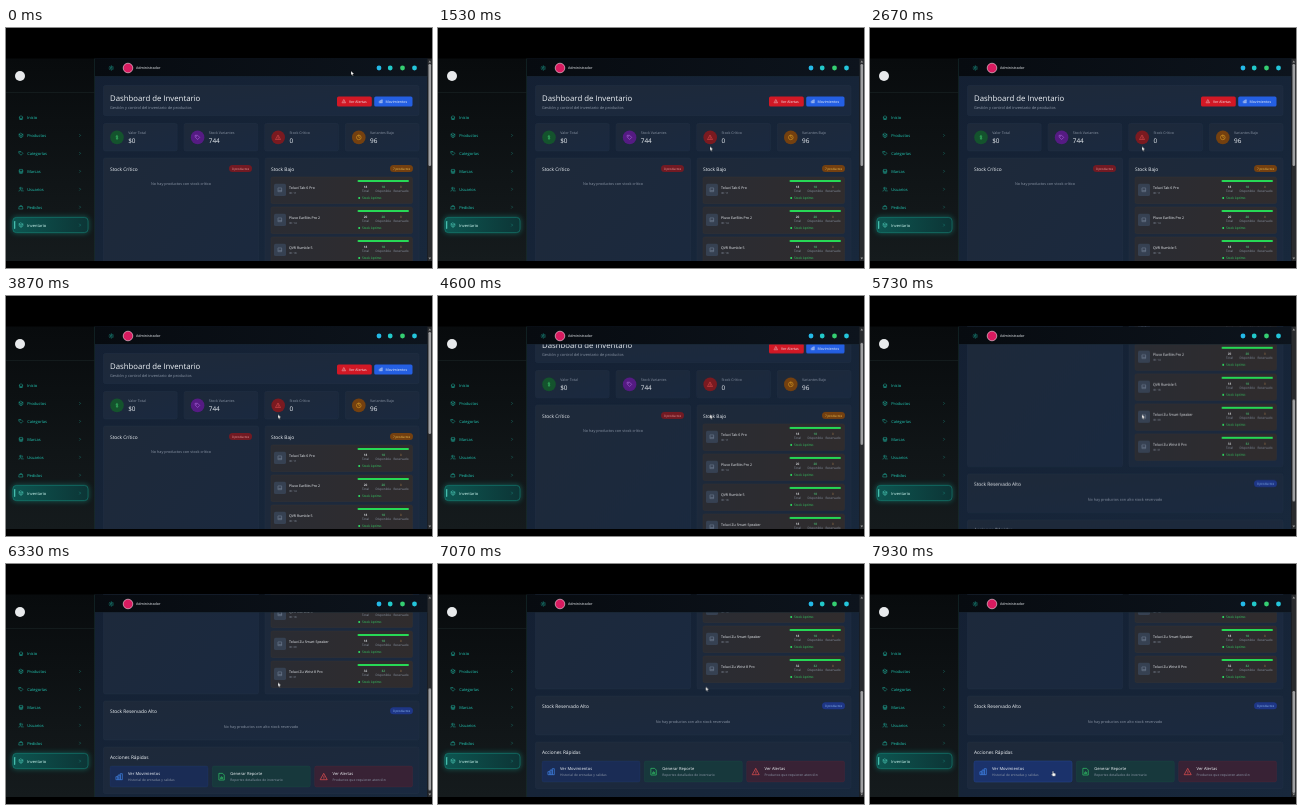
Animation of 426 by 240 pixels, one loop 8000 ms. Source, as an HTML page:

```html
<!DOCTYPE html>
<html lang="es">
<head>
<meta charset="utf-8">
<title>Dashboard de Inventario</title>
<style>
  html, body { margin: 0; width: 100%; height: 100%; overflow: hidden; background: #000; }
  svg { display: block; width: 100vw; height: 100vh; }
  text { font-family: "Open Sans", "Noto Sans", sans-serif; text-rendering: geometricPrecision; }
  .icon { fill: none; stroke-width: 2; stroke-linecap: round; stroke-linejoin: round; }
  #page { animation: scroll 8s linear infinite; }
  #thumb { animation: thumb 8s linear infinite; }
  #cursor { animation: travel 8s infinite; }
  #arrow { animation: leave 8s step-end infinite; }
  #hand, #hover { animation: arrive 8s step-end infinite; }
  @keyframes scroll {
    0%, 54.2% { transform: translateY(0); }
    57.5% { transform: translateY(-21px); }
    65% { transform: translateY(-95px); }
    79.1% { transform: translateY(-172px); }
    86%, 100% { transform: translateY(-177px); }
  }
  @keyframes thumb {
    0%, 54.2% { transform: translateY(0); }
    57.5% { transform: translateY(10.8px); }
    65% { transform: translateY(48.8px); }
    79.1% { transform: translateY(88.4px); }
    86%, 100% { transform: translateY(91px); }
  }
  @keyframes travel {
    0% { transform: translate(345px, 43px); animation-timing-function: ease-in-out; }
    15%, 87% { transform: translate(272px, 118.5px); animation-timing-function: ease-in-out; }
    96%, 100% { transform: translate(182.5px, 207px); }
  }
  @keyframes leave { 0% { opacity: 1; } 92.5%, 100% { opacity: 0; } }
  @keyframes arrive { 0% { opacity: 0; } 92.5%, 100% { opacity: 1; } }
</style>
</head>
<body>
<svg id="stage" viewBox="0 0 426 240" preserveAspectRatio="none"></svg>
<script>
const WHITE = '#f1f5f9', GRAY = '#8d98a8', TEAL = '#22c9b5';

const PATHS = {
  home: 'M3 11 12 3l9 8M5 10v11h14V10M10 21v-6h4v6',
  box: 'M12 2 21 7v10l-9 5-9-5V7zM3 7l9 5 9-5M12 12v10',
  tag: 'M3 3h9l9 9-9 9-9-9zM7.5 7.5h.1',
  shop: 'M4 10v11h16V10M3 10l2-7h14l2 7zM9 21v-6h6v6',
  users: 'M2 21c0-8 14-8 14 0M9 11a4 4 0 1 0 0-8 4 4 0 0 0 0 8M17 4c4 1 4 6 0 7M18 14c3 1 4 4 4 7',
  bag: 'M5 8h14l2 13H3zM8 8c0-7 8-7 8 0',
  chevron: 'M9 5l7 7-7 7',
  sun: 'M12 7a5 5 0 1 0 0 10 5 5 0 0 0 0-10M12 1v2M12 21v2M1 12h2M21 12h2M4 4l2 2M18 18l2 2M4 20l2-2M18 6l2-2',
  alert: 'M12 3 22 21H2zM12 10v5M12 18v.1',
  chart: 'M3 12h5v9H3zM9.5 7h5v14h-5zM16 3h5v18h-5z',
  clock: 'M12 2a10 10 0 1 0 0 20 10 10 0 0 0 0-20M12 6v6l4 2',
  money: 'M16 8c-1-3-8-3-8 .5 0 4 8 2.500 8 7 0 3.500-7 3.500-8 0M12 3v18',
  device: 'M4 3h16v18H4zM4 14h5l1 3h4l1-3h5',
  report: 'M5 2h10l5 5v15H5zM9 18v-3M12 18v-6M15 18v-4'
};

const text = (x, y, size, str, fill = WHITE, weight = 400, anchor = 'start') =>
  `<text x="${x}" y="${y}" font-size="${size}" fill="${fill}" font-weight="${weight}" text-anchor="${anchor}">${str}</text>`;
const rect = (x, y, w, h, r, fill, more = '') =>
  `<rect x="${x}" y="${y}" width="${w}" height="${h}" rx="${r}" fill="${fill}" ${more}/>`;
const border = color => `stroke="${color}" stroke-width=".35"`;
const dot = (x, y, r, fill, more = '') => `<circle cx="${x}" cy="${y}" r="${r}" fill="${fill}" ${more}/>`;
const icon = (cx, cy, size, name, color) =>
  `<path class="icon" d="${PATHS[name]}" stroke="${color}" transform="translate(${cx - size / 2} ${cy - size / 2}) scale(${size / 24})"/>`;
const card = (x, y, w, h) => rect(x, y, w, h, 1.6, 'url(#card)', border('#263548'));
const badge = (x, y, str, fill, color) =>
  rect(x, y, 23, 7, 3.5, fill) + text(x + 11.5, y + 4.6, 3.1, str, color, 500, 'middle');
const gradient = (id, from, to, x2 = 0, y2 = 1) =>
  `<linearGradient id="${id}" x2="${x2}" y2="${y2}"><stop stop-color="${from}"/><stop offset="1" stop-color="${to}"/></linearGradient>`;

function sidebar() {
  const entries = [['Inicio', 'home'], ['Productos', 'box'], ['Categorías', 'tag'], ['Marcas', 'shop'],
    ['Usuarios', 'users'], ['Pedidos', 'bag'], ['Inventario', 'box']];
  const rows = entries.map(([label, name], i) => {
    const y = 89.5 + i * 17.93, active = i === 6;
    return icon(15, y, 5, name, active ? '#5eead4' : TEAL) +
      text(21.2, y + 1.5, 4, label, active ? '#d5fff7' : TEAL, 500) +
      (i ? icon(74, y, 3.6, 'chevron', TEAL) : '');
  }).join('');
  return rect(0, 30.5, 89, 202.5, 0, 'url(#side)') +
    rect(88.5, 30.5, .5, 202.5, 0, '#183536') + rect(0, 64, 88.5, .4, 0, '#233030') +
    dot(14, 48, 5, '#e8eaec') +
    rect(5.5, 188, 78, 18, 5, '#14b8a6', 'opacity=".3" filter="url(#glow)"') +
    rect(6.8, 189.4, 75.2, 15.2, 3.5, 'url(#active)', 'stroke="#159083" stroke-width=".5"') +
    rect(8.3, 193, .9, 8, .45, '#5eead4') + rows;
}

function header() {
  const socials = [[373, '#24b9e8'], [384.2, '#22c9c9'], [396.5, '#35cf72'], [408.5, '#24c6dc']];
  return rect(89, 30.5, 333, 17.7, 0, 'url(#head)') + rect(89, 48, 333, .35, 0, '#1c2b38') +
    icon(105.3, 40, 5, 'sun', TEAL) +
    dot(122, 40, 4.8, '#d81b60', 'stroke="#f3dbe5" stroke-width=".6"') +
    text(130, 41.4, 3.65, 'Administrador', WHITE, 500) +
    socials.map(([x, color]) => dot(x, 40, 2.4, color)).join('');
}

function stats() {
  return [
    ['Valor Total', '$0', 'money', '#14532d', '#43d675'],
    ['Stock Variantes', '744', 'tag', '#551b83', '#c47cf5'],
    ['Stock Crítico', '0', 'alert', '#7a1a20', '#f05858'],
    ['Variantes Bajo', '96', 'clock', '#74400f', '#f5b62b']
  ].map(([label, value, name, fill, color], i) => {
    const x = 97.5 + i * 80.6;
    return card(x, 95.5, 73.7, 27.5) + dot(x + 13.5, 109.4, 6.8, fill) +
      icon(x + 13.5, 109.4, 5.6, name, color) +
      text(x + 24.7, 106.2, 3.6, label, GRAY) + text(x + 24.7, 114.9, 6.4, value, WHITE, 500);
  }).join('');
}

function stockRows() {
  return [
    ['Toluvi Tab 6 Pro', 11, 18], ['Pluvo EarBits Pro 2', 14, 20], ['QVR Rumble 5', 18, 18],
    ['Toluvi Zu Smart Speaker', 30, 18], ['Toluvi Zu Wrist 8 Pro', 31, 32]
  ].map(([name, id, count], i) => {
    const columns = [['Total', count, 359.5, WHITE], ['Disponible', count, 377.2, '#4dca78'], ['Reservado', 0, 395, '#8b6a45']];
    return `<g transform="translate(0 ${i * 30})">` +
      rect(265, 149, 141.5, 26.5, 1.6, 'url(#row)', border('#3a3433')) +
      rect(268, 155.7, 12, 12.3, 1.6, '#364152') + icon(274, 161.8, 5, 'device', '#8795aa') +
      text(283, 161.3, 3.55, name, WHITE, 500) + text(283, 165.8, 2.8, `ID: ${id}`, GRAY) +
      rect(351.5, 151.9, 51.5, 2.2, 1.1, '#27d855') +
      columns.map(([label, n, x, color]) =>
        text(x, 159.6, 3.1, n, color, 600, 'middle') + text(x, 163.8, 3.1, label, GRAY, 400, 'middle')).join('') +
      dot(353.2, 170, 1, '#2ee564') + text(356, 171.1, 3.2, 'Stock óptimo', '#35d465') + '</g>';
  }).join('');
}

function actions() {
  return [
    ['Ver Movimientos', 'Historial de entradas y salidas', 'chart', '#1a2c55', '#4388ee'],
    ['Generar Reporte', 'Reportes detallados de inventario', 'report', '#17383c', '#33ca6a'],
    ['Ver Alertas', 'Productos que requieren atención', 'alert', '#382235', '#ef5252']
  ].map(([label, note, name, fill, color], i) => {
    const x = 104 + i * 102.3;
    return rect(x, 374, 98, 21, 1.8, fill, border(color + '30')) +
      (i ? '' : `<g id="hover">${rect(x, 374, 98, 21, 1.8, '#1b326b', border('#294c96'))}</g>`) +
      icon(x + 9.3, 384.7, 8, name, color) +
      text(x + 18, 383.2, 4.1, label, WHITE, 500) + text(x + 18, 389.1, 3.35, note, GRAY);
  }).join('');
}

function page() {
  return card(97.5, 57.5, 315.5, 30) +
    text(104, 72.9, 7.8, 'Dashboard de Inventario', WHITE, 500) +
    text(104, 80.8, 3.9, 'Gestión y control del inventario de productos', GRAY) +
    rect(331, 68.4, 34.8, 10.2, 1.7, '#d21825') + icon(338, 73.3, 4, 'alert', WHITE) +
    text(343, 74.7, 3.5, 'Ver Alertas', WHITE, 500) +
    rect(368.2, 68.4, 38.3, 10.2, 1.7, '#245fe3') + icon(375, 73.3, 4, 'chart', WHITE) +
    text(379.5, 74.7, 3.6, 'Movimientos', WHITE, 500) +
    stats() +
    card(97.5, 130, 155, 172) + text(104, 142.5, 4.8, 'Stock Crítico', WHITE, 500) +
    badge(223, 137, '0 productos', '#721a23', '#f3a0a0') +
    text(175, 157.4, 3.75, 'No hay productos con stock crítico', GRAY, 400, 'middle') +
    card(259, 130, 154, 172) + text(265, 142.5, 4.8, 'Stock Bajo', WHITE, 500) +
    badge(384, 137, '7 productos', '#744010', '#f5c957') + stockRows() +
    card(97.5, 309, 315.5, 39) + text(104, 320.7, 4.8, 'Stock Reservado Alto', WHITE, 500) +
    badge(384, 315.3, '0 productos', '#1e3686', '#91bdf5') +
    text(255, 335.8, 3.75, 'No hay productos con alto stock reservado', GRAY, 400, 'middle') +
    card(97.5, 355, 315.5, 46.5) + text(104, 367.1, 4.8, 'Acciones Rápidas', WHITE, 500) + actions();
}

const scrollbar = rect(421.5, 30.5, 4.5, 202.5, 0, '#292b2e') +
  '<path d="M422.500 34.500h2.600l-1.300-2zM422.500 229.500h2.600l-1.300 2z" fill="#999"/>' +
  `<g id="thumb">${rect(422.5, 36, 2.6, 102, 1.3, '#a0a1a3')}</g>`;

const cursor = `<g id="cursor">
  <path id="arrow" d="M0 0v4.200l1-.9.7 1.500.7-.3-.7-1.500h1.400z" fill="#fff" stroke="#111" stroke-width=".25"/>
  <path id="hand" d="M0 .4q.5-.8 1 0v1.600l2 .6v1.700l-.6 1h-2l-1.500-2 .4-.4.7.5z" fill="#fff" stroke="#111" stroke-width=".25"/>
</g>`;

document.getElementById('stage').innerHTML = `<defs>
  ${gradient('side', '#080b0d', '#151b1d')}
  ${gradient('head', '#070b10', '#0d141d', 1, 0)}
  ${gradient('main', '#142033', '#18283c', 1, 1)}
  ${gradient('card', '#1e2939', '#1a2940', 1, 1)}
  ${gradient('row', '#2a2c33', '#302c2d', 1, 0)}
  ${gradient('active', '#0d5550', '#0c3536', 1, 0)}
  <filter id="glow" x="-20%" y="-60%" width="140%" height="220%"><feGaussianBlur stdDeviation="2.500"/></filter>
  <clipPath id="view"><rect x="89" y="30.500" width="332.500" height="202.500"/></clipPath>
</defs>` +
  rect(0, 0, 426, 240, 0, '#000') +
  rect(89, 30.5, 332.5, 202.5, 0, 'url(#main)') +
  `<g clip-path="url(#view)"><g id="page">${page()}</g></g>` +
  header() + sidebar() + scrollbar + cursor;
</script>
</body>
</html>
```
